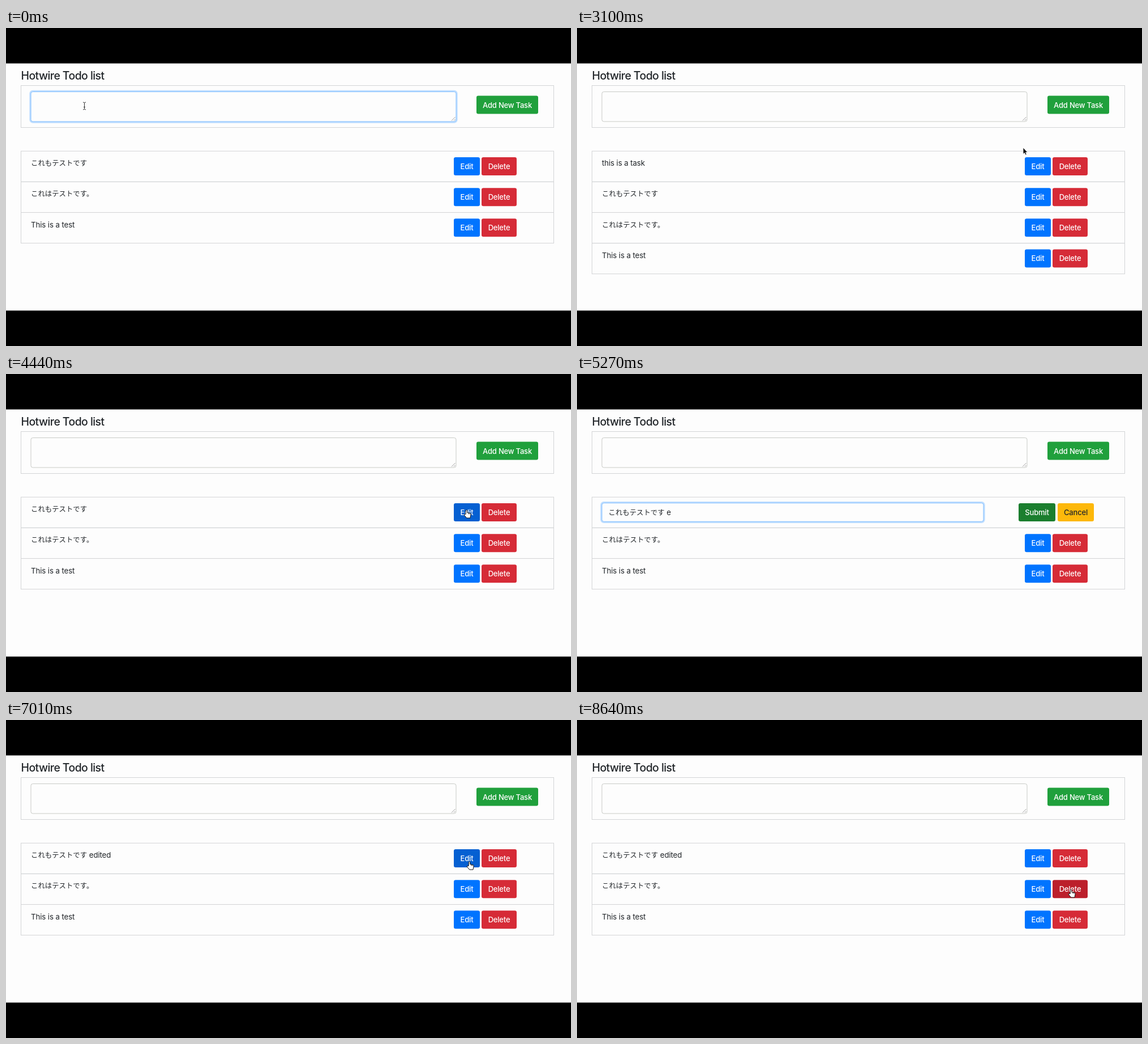
These frames come from a looping animation (998 px wide and 561 px high, 8.67 s). An HTML page:

```html
<!DOCTYPE html>
<html lang="ja">
<head>
<meta charset="utf-8">
<title>Hotwire Todo list</title>
<style>
html, body { margin: 0; width: 100%; height: 100%; overflow: hidden; background: #000; }
svg { display: block; font: 13.3px Inter, "Noto Sans CJK JP", "Noto Sans CJK", sans-serif; letter-spacing: -.12px; fill: #212529; }
text { white-space: pre; }
.title { font-size: 19.5px; font-weight: 500; letter-spacing: -.6px; }
.button { font-size: 13px; font-weight: 500; letter-spacing: -.2px; text-anchor: middle; }
.kana { font-size: 12.4px; letter-spacing: 0; }
</style>
</head>
<body>
<svg id="stage" width="998" height="561" viewBox="0 0 998 561"></svg>
<script>
const LOOP = 8670;
const ADD = 2350, REMOVE = 3850, EDIT = 4720, SAVE = 6480;
const stage = document.getElementById('stage');

const COLORS = {
  green: ['#20a03c', '#1b7e2e', '#fff'],
  blue: ['#0074ff', '#0560d2', '#fff'],
  red: ['#d62b37', '#bc1f2b', '#fff'],
  yellow: ['#fdb80b', '#e0a800', '#212529']
};

// Pointer stops: time, x, y
const STOPS = [
  [0, 138.5, 137.5], [1450, 138.5, 137.5], [1950, 852, 139], [2500, 852, 139],
  [3100, 788, 211], [3500, 866, 242], [3950, 866, 242], [4350, 813.5, 240],
  [5800, 813.5, 240], [6150, 819.5, 250], [6600, 819.5, 250], [6900, 818.5, 250],
  [7200, 818.5, 250], [8100, 872.5, 299], [LOOP, 872.5, 299]
];

// Typed text: start, end, characters
const TASK = [200, 1400, 'this is a task'];
const SUFFIX = [5050, 5700, ' edited'];

function typed([start, end, chars], t) {
  const part = Math.min(1, Math.max(0, (t - start) / (end - start)));
  return chars.slice(0, Math.floor(part * chars.length));
}

function pointerAt(t) {
  const i = STOPS.findIndex(stop => stop[0] > t);
  const [t0, x0, y0] = STOPS[i - 1], [t1, x1, y1] = STOPS[i];
  const u = (t - t0) / (t1 - t0), ease = u * u * (3 - 2 * u);
  return [x0 + (x1 - x0) * ease, y0 + (y1 - y0) * ease];
}

const box = (x, y, w, h, attrs) => `<rect x="${x}" y="${y}" width="${w}" height="${h}" ${attrs}/>`;

function label(x, y, str, kind = '') {
  const body = str.replace(/[\u3000-\u30ff]+/g, '<tspan class="kana">$&</tspan>');
  return `<text x="${x}" y="${y}" class="${kind}">${body}</text>`;
}

function field(x, y, w, h, focused) {
  const glow = focused ? box(x - 1.3, y - 1.3, w + 2.6, h + 2.6, 'rx="4.5" fill="none" stroke="#bfdeff" stroke-width="2.8"') : '';
  return glow + box(x, y, w, h, `rx="3.4" fill="#fdfdfd" stroke="${focused ? '#80bdff' : '#c9cbc6'}"`);
}

function drawPointer(x, y, kind) {
  const shapes = {
    text: '<path d="M-2.5-6.5Q0-6.5 0-5V5Q0 6.5-2.5 6.5M2.5-6.5Q0-6.5 0-5V5Q0 6.5 2.5 6.5M-1.5 2H1.5" fill="none" stroke="#333"/>',
    hand: '<path d="M-1.3 7.4V.6Q0-1.2 1.3.6V4.5L6.4 5.5Q7.8 6 7.6 8L6.5 14H.2L-4 9Q-4.6 7.2-2.8 7.2Z" fill="#fff" stroke="#111"/><path d="M3.3 5V7.4M5.4 5.5V7.6" stroke="#111" stroke-width=".8"/>',
    arrow: '<path d="M0 0V11.5L2.5 9.2L4.2 13L6.2 12.1L4.6 8.5H8Z" fill="#111" stroke="#fff" stroke-width=".8"/>'
  };
  return `<g transform="translate(${x} ${y})">${shapes[kind]}</g>`;
}

function draw(t) {
  const [px, py] = pointerAt(t);
  const typing = [TASK, SUFFIX].some(([start, end]) => t >= start && t < end + 100);
  const focused = t < 2200, editing = t >= EDIT && t < SAVE;
  const inside = (x, y, w, h) => px >= x && px <= x + w && py >= y && py <= y + h;
  let pointer = inside(44, 112, 751, 53) ? 'text' : 'arrow';

  function button(x, y, w, str, color) {
    const [base, dark, ink] = COLORS[color], over = inside(x, y, w, 32);
    if (over) pointer = 'hand';
    return box(x, y, w, 32, `rx="3.2" fill="${over ? dark : base}"`) +
      `<g fill="${ink}">${label(x + w / 2, y + 21, str, 'button')}</g>`;
  }

  const first = 'これもテストです' + typed(SUFFIX, t);
  const rows = [first, 'これはテストです。', 'This is a test'];
  if (t >= ADD && t < REMOVE) rows.unshift(TASK[2]);

  let out = box(0, 62.5, 998, 436, 'fill="#fdfdfd"') + label(26.5, 90.5, 'Hotwire Todo list', 'title');
  const frame = 'fill="none" stroke="#d3d4d6"';
  out += box(26.5, 101.5, 941, 74, frame) + field(44, 112.5, 751, 52.5, focused);
  out += '<path d="M787 163.5L793.5 157M791 163.5L793.5 161" stroke="#888" stroke-width=".8"/>';
  if (t < ADD) out += label(54.5, 133.5, typed(TASK, t));
  out += button(831, 119.5, 109, 'Add New Task', 'green');

  rows.forEach((row, i) => {
    const y = 217.2 + i * 54.15, top = y + 10.8;
    out += box(26.5, y, 941, 54.1, frame);
    if (editing && i === 0) {
      out += field(44, 227.7, 674, 32.6, true) + label(55.5, 248.5, row);
      out += button(780, top, 65, 'Submit', 'green') + button(849, top, 64, 'Cancel', 'yellow');
    } else {
      out += label(44, y + 26, row);
      out += button(791, top, 46, 'Edit', 'blue') + button(840, top, 62, 'Delete', 'red');
    }
  });
  if (editing && inside(44, 228, 674, 32)) pointer = 'text';
  if (!typing) out += drawPointer(px, py, pointer);
  stage.innerHTML = out;
}

function tick() {
  draw(performance.now() % LOOP);
  requestAnimationFrame(tick);
}
tick();
</script>
</body>
</html>
```
